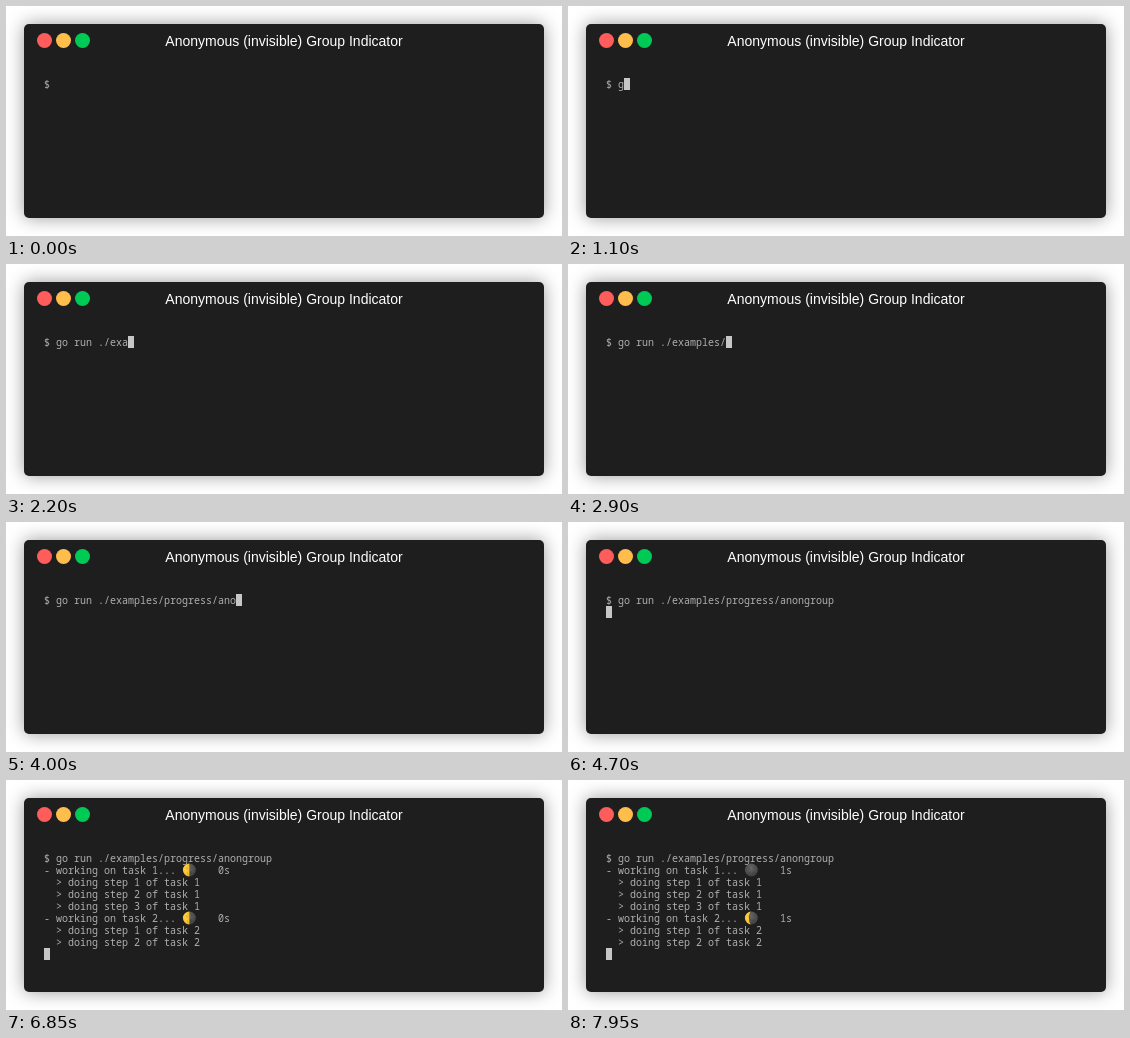
Recreate the animation shown at these times as an HTML page. Size 556 by 230 pixels, loop 8000 ms.

```html
<!DOCTYPE html>
<html lang="en">
<head>
<meta charset="utf-8">
<title>Anonymous (invisible) Group Indicator</title>
<style>
  html, body { margin: 0; width: 556px; height: 230px; overflow: hidden; background: #fff; }
  .window {
    position: absolute; left: 18px; top: 18px; width: 520px; height: 194px;
    border-radius: 5px; background: #1e1e1e; box-shadow: 0 0 18px rgba(0, 0, 0, .4);
  }
  svg { position: absolute; left: 0; top: 0; display: block; }
  .title { font: 14px "Liberation Sans", Arial, sans-serif; fill: #fff; text-anchor: middle; }
  #screen { font: 10px "Noto Sans Mono", "DejaVu Sans Mono", monospace; fill: #afafaf; }
  #screen text { white-space: pre; }
</style>
</head>
<body>
<div class="window"></div>
<svg width="556" height="230" viewBox="0 0 556 230">
  <defs>
    <radialGradient id="dark" cx=".45" cy=".35" r=".65">
      <stop offset="0" stop-color="#686868"/>
      <stop offset="1" stop-color="#3e3e3e"/>
    </radialGradient>
    <radialGradient id="lit" cx=".45" cy=".4" r=".65">
      <stop offset="0" stop-color="#ffd84a"/>
      <stop offset="1" stop-color="#f2b31c"/>
    </radialGradient>
  </defs>
  <circle cx="38.5" cy="34.5" r="7.5" fill="#ff5c5c"/>
  <circle cx="57.5" cy="34.5" r="7.5" fill="#ffbd4c"/>
  <circle cx="76.5" cy="34.5" r="7.5" fill="#00ca56"/>
  <text class="title" x="278" y="40">Anonymous (invisible) Group Indicator</text>
  <g id="screen"></g>
</svg>
<script>
const LOOP = 8000, LEFT = 38, TOP = 72, COL = 6, ROW = 12;
const COMMAND = 'go run ./examples/progress/anongroup';
const TYPE_START = 1100, KEY = 100, ENTER = 4700;
const LATE = [2000, 2800, 2900, 3400, 3600, 4400];

// time, moon phase and step count for each task, seconds
const PROGRESS = [
  [6220, 1, 1, 1, 1, 0],
  [6440, 3, 3, 2, 1, 0],
  [6630, 4, 4, 2, 2, 0],
  [6740, 5, 5, 3, 2, 0],
  [6850, 6, 6, 3, 2, 0],
  [7090, 0, 0, 3, 2, 1],
  [7310, 2, 2, 3, 2, 1],
  [7420, 3, 3, 3, 2, 1],
  [7530, 4, 4, 3, 2, 1],
  [7650, 5, 5, 3, 2, 1],
  [7850, 7, 6, 3, 2, 1],
  [7950, 0, 7, 3, 2, 1]
];

const screen = document.getElementById('screen');

function add(tag, attrs, text) {
  const el = document.createElementNS('http://www.w3.org/2000/svg', tag);
  for (const key in attrs) el.setAttribute(key, attrs[key]);
  if (text) el.textContent = text;
  screen.appendChild(el);
}

function write(row, col, text) {
  add('text', { x: LEFT + col * COL, y: TOP + row * ROW + 10 }, text);
}

function cursor(row, col) {
  add('rect', { x: LEFT + col * COL, y: TOP + row * ROW, width: COL, height: ROW, fill: '#c7c7c7' });
}

// Phases 0 to 7 run from new moon through full and back
function moon(row, phase) {
  const x = 183.4, y = TOP + row * ROW + 18 - ROW, r = 6.5;
  add('circle', { cx: x, cy: y, r, fill: 'url(#dark)' });
  if (phase === 4) {
    add('circle', { cx: x, cy: y, r, fill: 'url(#lit)' });
  } else if (phase) {
    const waxing = phase < 4 ? 1 : 0;
    const gibbous = phase > 2 && phase < 6;
    const rx = phase % 4 === 2 ? 0.01 : r * 0.38;
    const back = gibbous ? waxing : 1 - waxing;
    add('path', {
      d: `M${x} ${y - r}A${r} ${r} 0 0 ${waxing} ${x} ${y + r}A${rx} ${r} 0 0 ${back} ${x} ${y - r}Z`,
      fill: 'url(#lit)'
    });
  }
  for (const [dx, dy, size] of [[-2.6, -1.6, 1.3], [1.8, 2.4, 1.1], [2.4, -2.6, .8], [-1.8, 3, .8]])
    add('circle', { cx: x + dx, cy: y + dy, r: size, fill: '#000', opacity: .1 });
}

function typedCount(t) {
  const tick = Math.floor(t / KEY) * KEY;
  const n = (tick - TYPE_START) / KEY + 1 - (LATE.includes(tick) ? 1 : 0);
  return Math.max(0, Math.min(COMMAND.length, n));
}

function draw(count, entered, state, showCursor) {
  screen.replaceChildren();
  write(0, 0, '$');
  if (count) write(0, 2, COMMAND.slice(0, count));
  let row = 1;
  if (state) {
    const seconds = state[5];
    for (const task of [1, 2]) {
      write(row, 0, `- working on task ${task}...`);
      moon(row, state[task]);
      write(row++, 29, seconds + 's');
      for (let step = 1; step <= state[task + 2]; step++)
        write(row++, 2, `> doing step ${step} of task ${task}`);
    }
  }
  if (entered) cursor(row, 0);
  else if (showCursor) cursor(0, 2 + count);
}

let shown = '';
function render(t) {
  const count = typedCount(t);
  const entered = t >= ENTER;
  const state = PROGRESS.filter(step => step[0] <= t).pop();
  const showCursor = t >= 100;
  const key = [count, entered, state, showCursor].join();
  if (key === shown) return;
  shown = key;
  draw(count, entered, state, showCursor);
}

const start = performance.now();
function tick() {
  render((performance.now() - start) % LOOP);
  requestAnimationFrame(tick);
}
tick();
</script>
</body>
</html>
```
